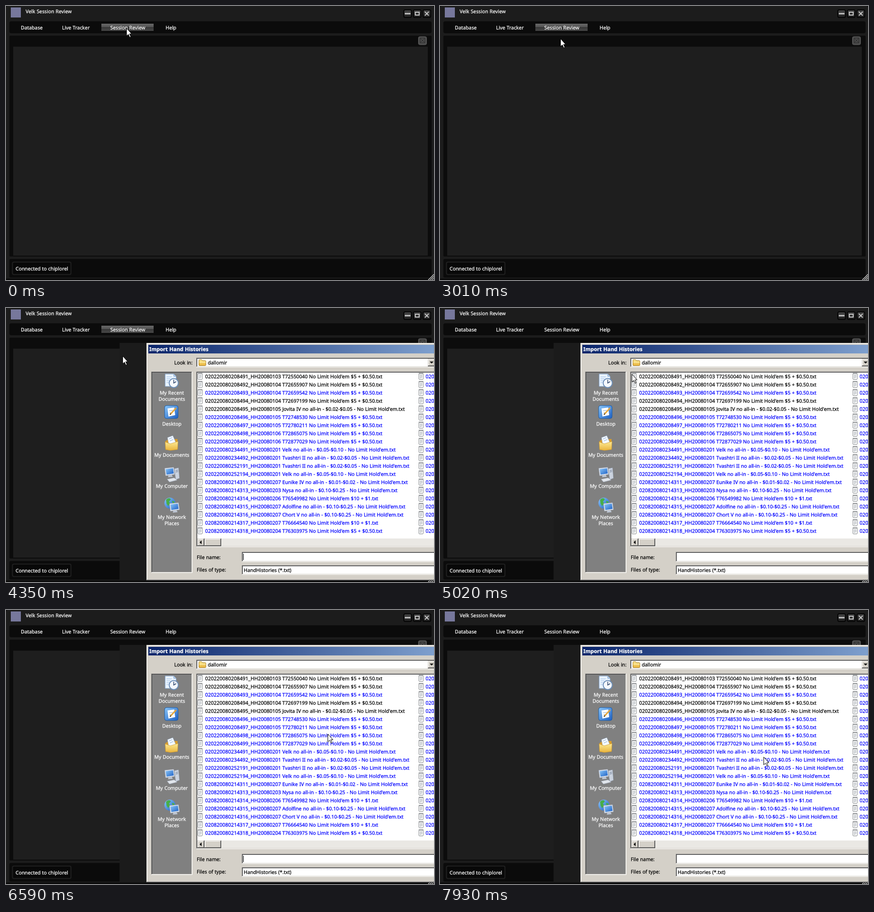
An HTML page for the animation above (8000 ms loop, 893x573 px).

```html
<!DOCTYPE html>
<html lang="en">
<head>
<meta charset="utf-8">
<title>Velk Session Review</title>
<style>
html, body { margin: 0; width: 100%; height: 100%; overflow: hidden; background: #1c1c1c; }
svg { display: block; width: 893px; height: 573px; }
text {
  font: 10.3px "Noto Sans", sans-serif; word-spacing: .35px; white-space: pre;
  text-rendering: geometricPrecision;
  fill: currentColor; stroke: currentColor; stroke-width: .25px;
}
.light { color: #fff; }
.id { font-size: 10.5px; }
.mid { text-anchor: middle; color: #fff; }
.bold { font-size: 11px; font-weight: 700; color: #fff; }
</style>
</head>
<body>
<svg viewBox="0 0 893 573" xmlns="http://www.w3.org/2000/svg">
  <defs>
    <linearGradient id="hot" x2="0" y2="1">
      <stop offset="0" stop-color="#686868"/><stop offset=".5" stop-color="#525252"/>
      <stop offset=".5" stop-color="#383838"/><stop offset="1" stop-color="#484848"/>
    </linearGradient>
    <linearGradient id="button" x2="0" y2="1">
      <stop offset="0" stop-color="#484848"/><stop offset="1" stop-color="#1c1c1c"/>
    </linearGradient>
    <linearGradient id="caption" gradientUnits="userSpaceOnUse" x1="297" x2="1100">
      <stop offset="0" stop-color="#0a246a"/><stop offset="1" stop-color="#a6caf0"/>
    </linearGradient>
    <linearGradient id="screen" x2="1" y2="1">
      <stop offset="0" stop-color="#8cc8fa"/><stop offset="1" stop-color="#1c5fc4"/>
    </linearGradient>
    <linearGradient id="folder" x2="0" y2="1">
      <stop offset="0" stop-color="#fdeb96"/><stop offset="1" stop-color="#e9b43c"/>
    </linearGradient>
    <g id="note">
      <path d="M1.5 2.5V13Q1.5 14.5 3 14.5H9Q10.5 14.5 10.5 13V2.5Z" fill="#fff" stroke="#85898c"/>
      <path d="M1.5 1.5H10.5" stroke="#5c6064" stroke-width="2" stroke-dasharray="1 1"/>
      <path d="M3.5 5.5H8.5M3.5 7.5H8.5M3.5 9.5H8.5M3.5 11.5H7" stroke="#a3aab0"/>
    </g>
    <g id="monitor">
      <path d="M1 2L20 0 22 15 3 18Z" fill="#dfe4ec" stroke="#8e97a8" stroke-width=".7"/>
      <path d="M3 4L18.5 2 20 13 5 15.5Z" fill="url(#screen)"/>
      <path d="M9 17L16 16 18 20 8 21Z" fill="#bfc7d4"/>
    </g>
  </defs>

  <g class="light">
    <rect width="893" height="573" fill="#1c1c1c"/>
    <path d="M0 0H5Q0 0 0 5ZM893 0H888Q893 0 893 5ZM0 570H893V573H0Z" fill="#0a0a0a"/>
    <rect x="7" y="32" width="881" height="25" rx="4" fill="#0b0b0b"/>
    <rect x="7" y="62" width="881" height="462" rx="2" fill="#0c0c0c"/>
    <rect x="15" y="85" width="865" height="437" fill="#1e1e1e"/>
    <rect x="7" y="529" width="881" height="39" rx="3" fill="#0b0b0b"/>
    <rect x="13.5" y="535.5" width="122" height="26" rx="3" fill="#080808" stroke="#202020" stroke-width="2"/>
    <rect x="10" y="3" width="21" height="21" fill="#77789c"/>
    <rect id="menuHot" x="199" y="37" width="109" height="15" fill="url(#hot)"/>
    <text x="41" y="15">Velk Session Review</text>
    <text x="31" y="49">Database</text>
    <text x="117" y="49">Live Tracker</text>
    <text x="217.5" y="49">Session Review</text>
    <text x="333" y="49">Help</text>
    <text x="20" y="553">Connected to chiplorel</text>

    <g fill="url(#button)" stroke="#050505" stroke-width="2">
      <rect x="830" y="8" width="16" height="16" rx="3"/>
      <rect x="850" y="8" width="16" height="16" rx="3"/>
      <rect x="870" y="8" width="16" height="16" rx="3"/>
    </g>
    <g fill="none" stroke="#c4c4c4" stroke-width="2">
      <path d="M832 16H844" stroke-width="3"/>
      <path d="M854 13H862V19H854Z"/>
      <path d="M874 12L882 20M882 12L874 20"/>
    </g>
    <rect x="860.5" y="64" width="17" height="17" rx="3" fill="#4b4b4b" stroke="#5c5c5c"/>
    <path d="M864 67H874V77H864ZM865 68L873 76M873 68L865 76" fill="none" stroke="#292929"/>
    <path d="M881 573L893 561M885 573L893 565M889 573L893 569" stroke="#c8c8c8" stroke-width="1.5"/>
  </g>

  <g id="dialog">
    <rect x="237" y="73" width="56" height="497" fill="#1b1b1b"/>
    <rect x="293" y="73" width="600" height="497" fill="#d4d0c8"/>
    <path d="M294.5 569V74.5H893" fill="none" stroke="#fff"/>
    <path d="M293 569.5H893" stroke="#404040"/>
    <path d="M294 568.5H893" stroke="#808080"/>
    <rect x="297" y="77" width="596" height="18" fill="url(#caption)"/>
    <text class="bold" x="299" y="90">Import Hand Histories</text>
    <text x="351" y="118">Look in:</text>
    <text x="398" y="525">File name:</text>
    <text x="398" y="551">Files of type:</text>
    <g id="controls"></g>

    <path d="M402.5 119V109.5Q402.5 108 404 108H408L410 110H415.5Q417 110 417 112V119Q417 120.5 415.5 120.5H404Q402.5 120.5 402.5 119Z" fill="url(#folder)" stroke="#a57b1e"/>
    <path d="M403 113.5H416.5" stroke="#fff4bd"/>
    <text x="421" y="118">dallomir</text>
    <path d="M884 112H892L888 116ZM408 486V494L404 490Z"/>

    <g id="places">
      <g transform="translate(330 137)">
        <path d="M2 1H20L25 6V27H2Z" fill="#eaf4ff" stroke="#7f9fc8"/>
        <path d="M20 1V6H25" fill="#b9d4f2" stroke="#7f9fc8"/>
        <path d="M5 7H16M5 11H13M5 15H11M5 19H11" stroke="#9dbde4"/>
        <circle cx="20" cy="20" r="9.5" fill="#f5f8fc" stroke="#6d8fb8" stroke-width="2"/>
        <path d="M20 13V20L25 17" fill="none" stroke="#334a70" stroke-width="1.5"/>
      </g>
      <g transform="translate(330 202)">
        <rect x="1" y="2" width="28" height="27" rx="4" fill="url(#screen)" stroke="#175aa8"/>
        <path d="M7 8L21 6 23 22 9 25Z" fill="#fff"/>
        <path d="M10 13L18 12M11 17L16 16.3" stroke="#8aa9cc"/>
        <path d="M13 20L25 7" stroke="#e4a63c" stroke-width="3"/>
        <path d="M12 21L14 19" stroke="#333" stroke-width="2"/>
      </g>
      <g transform="translate(330 266)">
        <path d="M2 13L9 8H28V29L3 31Z" fill="#d69c2e"/>
        <path d="M7 5L18 1 25 17 10 22Z" fill="#f5f9ff" stroke="#9cb4cf" stroke-width=".7"/>
        <path d="M10 8L17 5M12 12L19 9" stroke="#82a9d6"/>
        <path d="M2 14L13 18 29 13 28 30 13 32 3 30Z" fill="url(#folder)" stroke="#c8932c" stroke-width=".7"/>
      </g>
      <g transform="translate(330 333)">
        <path d="M21 3L30 1 32 23 24 26Z" fill="#cbd3df" stroke="#8790a0" stroke-width=".7"/>
        <path d="M24 7L29 6M24 10L29 9" stroke="#66758d"/>
        <use href="#monitor"/>
        <path d="M6 25L21 22 27 27 11 31Z" fill="#e1e5eb" stroke="#929cac" stroke-width=".7"/>
      </g>
      <g transform="translate(330 396)">
        <circle cx="12" cy="12" r="11.5" fill="url(#screen)"/>
        <path d="M4 5Q10 -1 14 4L10 9 13 13 8 18 5 13ZM16 7L22 9 19 16Z" fill="#48ae48"/>
        <use href="#monitor" x="10" y="11"/>
      </g>
    </g>
    <g id="labels"></g>
    <g id="files"></g>
    <text x="496" y="552">HandHistories (*.txt)</text>
    <path id="caret" d="M495.5 514V527" stroke="#000"/>
  </g>

  <g id="hourglass" transform="translate(238 90)">
    <path d="M1 1H10V4L7 10 10 16V20H1V16L4 10 1 4Z" fill="#fff" stroke="#000"/>
    <path d="M0 .5H11M0 20H11" stroke="#fff"/>
    <path d="M0 2.5H11M0 18H11" stroke="#000"/>
    <path d="M3.5 6H7.5L5.5 9ZM5.5 12L8 16H3Z" fill="#444"/>
  </g>
  <g id="arrow">
    <path d="M.5 .5V16.8L4.2 13.3 7.2 19.5 9.5 18.5 6.7 12.3H11.2Z" fill="#fff" stroke="#000"/>
  </g>
</svg>
<script>
const LOOP = 8000;
const $ = id => document.getElementById(id);

function add(parent, tag, attrs, content = '') {
  const el = document.createElementNS('http://www.w3.org/2000/svg', tag);
  for (const key in attrs) el.setAttribute(key, attrs[key]);
  el.textContent = content;
  parent.append(el);
}

// Two-pixel bevel: outer and inner colours for the top-left and bottom-right edges.
function bevel(x, y, right, bottom, [outerTL, innerTL, outerBR, innerBR], fill) {
  const box = (l, t, r, b, color) =>
    add($('controls'), 'rect', { x: l, y: t, width: r - l, height: b - t, fill: color });
  box(x, y, right, bottom, outerBR);
  box(x, y, right - 1, bottom - 1, outerTL);
  box(x + 1, y + 1, right - 1, bottom - 1, innerBR);
  box(x + 1, y + 1, right - 2, bottom - 2, innerTL);
  box(x + 2, y + 2, right - 2, bottom - 2, fill);
}
const FACE = '#d4d0c8';
const sunken = ['#808080', '#404040', '#fff', FACE];
const raised = [FACE, '#fff', '#404040', '#808080'];
bevel(397, 104, 900, 124, sunken, '#fff');
bevel(303, 133, 389, 554, sunken, '#808080');
bevel(397, 133, 900, 500, sunken, '#fff');
bevel(492, 510, 900, 531, sunken, '#fff');
bevel(492, 538, 900, 558, sunken, '#fff');
add($('controls'), 'rect', { x: 399, y: 482, width: 494, height: 16, fill: '#eae8e4' });
bevel(880, 106, 896, 122, raised, FACE);
bevel(399, 482, 414, 498, raised, FACE);
bevel(414, 482, 449, 498, raised, FACE);

[['My Recent', 181], ['Documents', 194], ['Desktop', 246], ['My Documents', 311],
 ['My Computer', 376], ['My Network', 441], ['Places', 454]]
  .forEach(([label, y]) => add($('labels'), 'text', { x: 346, y, class: 'mid' }, label));

const sitAndGo = (id, cost = '$5 + $0.50') => `T${id} No Limit Hold'em ${cost}.txt`;
const cash = (table, stakes) => `${table} no all-in - ${stakes} - No Limit Hold'em.txt`;
const files = [
  ['020220080208491', '0103', sitAndGo(72550040)],
  ['020220080208492', '0104', sitAndGo(72655907)],
  ['020220080208493', '0104', sitAndGo(72659542)],
  ['020220080208494', '0104', sitAndGo(72697199)],
  ['020220080208495', '0105', cash('Jovita IV', '$0.02-$0.05')],
  ['020220080208496', '0105', sitAndGo(72748530)],
  ['020220080208497', '0105', sitAndGo(72780211)],
  ['020220080208498', '0106', sitAndGo(72865075)],
  ['020220080208499', '0106', sitAndGo(72877029)],
  ['020220080234491', '0201', cash('Velk', '$0.05-$0.10')],
  ['020220080234492', '0201', cash('Tvashtri II', '$0.02-$0.05')],
  ['020220080252191', '0201', cash('Tvashtri II', '$0.02-$0.05')],
  ['020220080252194', '0201', cash('Velk', '$0.05-$0.10')],
  ['020820080214311', '0207', cash('Eunike IV', '$0.01-$0.02')],
  ['020820080214313', '0203', cash('Nysa', '$0.10-$0.25')],
  ['020820080214314', '0206', sitAndGo(76549982, '$10 + $1')],
  ['020820080214315', '0207', cash('Adolfine', '$0.10-$0.25')],
  ['020820080214316', '0207', cash('Chort V', '$0.10-$0.25')],
  ['020820080214317', '0207', sitAndGo(76664540, '$10 + $1')],
  ['020820080214318', '0204', sitAndGo(76303975)],
];
const BLUE = '#0000ff';
const blackRows = [0, 1, 3, 4];
files.forEach(([id, day, name], i) => {
  const g = $('files'), y = 147 + 17 * i;
  const color = blackRows.includes(i) ? '#000' : BLUE;
  for (const x of [399, 860]) add(g, 'use', { href: '#note', x, y: y - 12 });
  add(g, 'text', { x: 415.5, y, color, class: 'id' }, `${id}_HH2008${day}`);
  add(g, 'text', { x: 576.5, y, color }, name);
  add(g, 'text', { x: 875.5, y, color: BLUE, class: 'id' }, '020');
});

// Each step holds its value until the next one.
function play(id, prop, steps) {
  const frames = steps.map(([time, value]) =>
    ({ offset: time / LOOP, [prop]: value, easing: 'steps(1, end)' }));
  frames.push({ offset: 1, [prop]: steps.at(-1)[1] });
  $(id).animate(frames, { duration: LOOP, iterations: Infinity });
}

const pointer = [
  [0, 251, 46], [120, 251, 51], [370, 251, 53], [520, 250, 55], [640, 250, 57],
  [3010, 251, 68], [3160, 252, 80], [3320, 252, 86], [3470, 245, 93], [3840, 245, 96],
  [3980, 243, 100], [4770, 262, 103], [4890, 325, 116], [5010, 400, 138], [5130, 475, 164],
  [5260, 545, 190], [5380, 602, 208], [5500, 629, 213], [5620, 641, 214], [5740, 651, 215],
  [5860, 658, 218], [5980, 664, 221], [6100, 667, 225], [6350, 668, 238], [6470, 670, 250],
  [6590, 671, 259], [6840, 674, 264], [6960, 679, 270], [7080, 684, 277], [7200, 685, 284],
  [7320, 683, 291], [7440, 679, 299], [7560, 674, 306], [7810, 675, 307],
];
play('arrow', 'transform', pointer.map(([time, x, y]) => [time, `translate(${x}px, ${y}px)`]));
play('arrow', 'opacity', [[0, 1], [4230, 0], [4350, 1]]);
play('hourglass', 'opacity', [[0, 0], [4230, 1], [4350, 0]]);
play('dialog', 'opacity', [[0, 0], [4350, 1]]);
play('menuHot', 'opacity', [[0, 1], [4510, 0]]);
play('caret', 'opacity', [[0, 1], [4890, 0], [5380, 1], [5980, 0], [6470, 1], [7080, 0], [7560, 1], [7930, 0]]);
</script>
</body>
</html>
```
